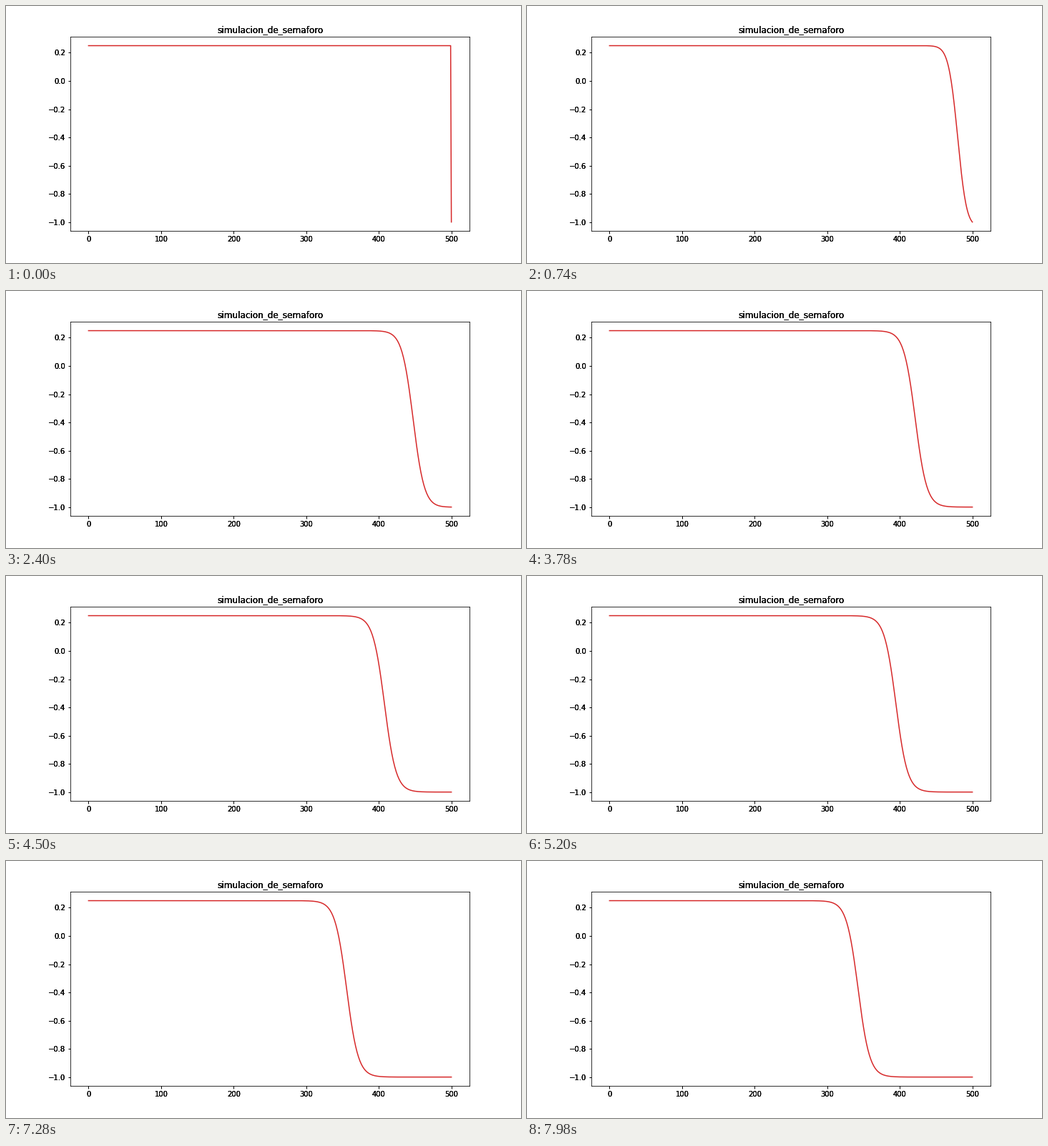
A matplotlib script that plays this animation: 720 px wide and 360 px high, repeating every 8000 ms.

```python
import numpy as np
import matplotlib.pyplot as plt
from matplotlib.animation import FuncAnimation
from matplotlib.transforms import ScaledTranslation

FRAMES, INTERVAL = 400, 20
LEFT, RIGHT = 0.25, -1.0
NU = 5.0          # viscosity
SUBSTEPS = 20     # solver steps per frame
TEXT_LAYERS = 3   # stacked copies harden the glyph edges

plt.rcParams.update({"font.family": "DejaVu Sans", "font.size": 10})


def solve():
    """Viscous Burgers equation with fixed ends; one row per frame."""
    u = np.full(501, LEFT)
    u[-1] = RIGHT
    dt = 1 / SUBSTEPS
    rows = [u.copy()]
    for _ in range(FRAMES - 1):
        for _ in range(SUBSTEPS):
            flux = (u[:-1] ** 2 + u[1:] ** 2) / 4 - NU * np.diff(u)
            u[1:-1] -= dt * np.diff(flux)
        rows.append(u.copy())
    return rows


waves = solve()
x = np.arange(501)

fig, ax = plt.subplots(figsize=(10, 5), dpi=72, facecolor="white")
fig.subplots_adjust(left=0.125, right=0.9, bottom=0.125, top=0.88)
ax.set_xlim(-25, 525)
ax.set_ylim(-1.0625, 0.3125)
xticks = np.arange(0, 501, 100)
yticks = np.linspace(-1, 0.2, 7).round(1)
ax.set_xticks(xticks)
ax.set_yticks(yticks)
ax.tick_params(labelbottom=False, labelleft=False, width=1)


def label(px, py, text, base, dx, dy, **style):
    shift = ScaledTranslation(dx / 72, dy / 72, fig.dpi_scale_trans)
    for _ in range(TEXT_LAYERS):
        ax.text(px, py, text, transform=base + shift, **style)


for v in xticks:
    label(v, 0, str(v), ax.get_xaxis_transform(), 0, -7,
          ha="center", va="top")
for v in yticks:
    text = f"{abs(v):.1f}"
    label(0, v, "\u2212" + text if v < 0 else text,
          ax.get_yaxis_transform(), -7, 0,
          ha="right", va="center_baseline")
label(0.5, 1, "simulacion_de_semaforo", ax.transAxes, 0, 6,
      ha="center", va="baseline", fontsize=12)

line, = ax.plot(x, waves[0], color="tab:red", lw=1.5)


def update(i):
    line.set_ydata(waves[i])
    return line,


anim = FuncAnimation(fig, update, frames=FRAMES, interval=INTERVAL,
                     repeat=True, repeat_delay=0, blit=False)
plt.show()
```
